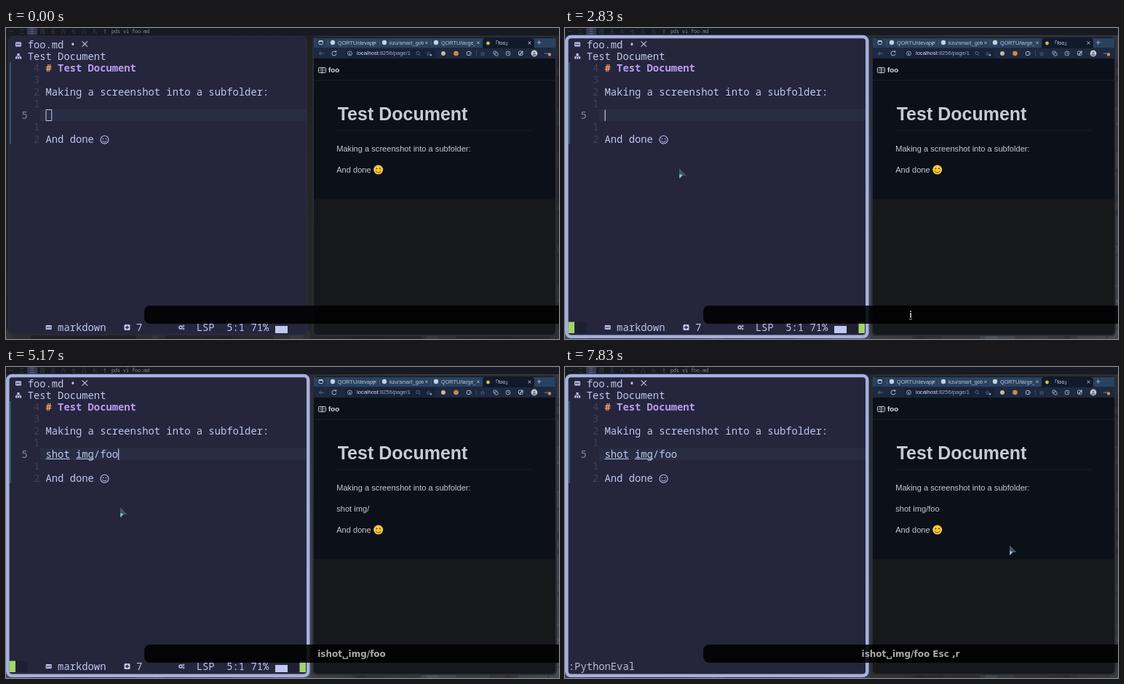
Animation, 760 px wide and 428 px high, one loop 8000 ms. Source, as an HTML page with a canvas:

```html
<!DOCTYPE html>
<html lang="en">
<head>
<meta charset="utf-8">
<title>Editor and preview</title>
<style>
  html, body { margin: 0; height: 100%; overflow: hidden; background: #17181c; }
  canvas { display: block; }
</style>
</head>
<body>
<canvas id="stage" width="760" height="428"></canvas>
<script>
const ctx = document.getElementById('stage').getContext('2d');
const LOOP = 8000;
const CELL = 8.29, ROW = 16.23;
const MONO = '"Noto Sans Mono", "DejaVu Sans Mono", monospace';
const SANS = '"Liberation Sans", Arial, sans-serif';
const FG = '#c0c8f0', TEAL = '#2fb4c4', EDITOR = '#25263c', DIM = '#3d415c';

// When each typed character reaches the editor
const TYPED = [
  [3080, 's'], [3250, 'h'], [3330, 'o'], [3500, 't'], [3750, ' '], [4000, 'i'], [4080, 'm'],
  [4250, 'g'], [4420, '/'], [4580, 'f'], [4670, 'o'], [4830, 'o']
];
// What the key display shows: start, text, number of underlined last keys
const KEYS = [
  [0, '', 0], [2580, 'i', 1], [2920, 'i', 0], [3080, 'is', 1], [3250, 'ish', 1], [3330, 'isho', 2],
  [3500, 'ishot', 1], [3750, 'ishot␣', 1], [4000, 'ishot␣i', 1], [4080, 'ishot␣im', 1],
  [4170, 'ishot␣img', 1], [4420, 'ishot␣img/', 1], [4580, 'ishot␣img/f', 1],
  [4670, 'ishot␣img/fo', 1], [4830, 'ishot␣img/foo', 1], [5080, 'ishot␣img/foo', 0],
  [5670, 'ishot␣img/foo Esc', 0], [6250, 'ishot␣img/foo Esc ,', 0], [6420, 'ishot␣img/foo Esc ,r', 0]
];
const PREVIEW = [[0, ''], [3670, 'sho'], [4750, 'shot img/'], [5500, 'shot img/foo']];

const at = (list, t) => list.filter(e => e[0] <= t).pop();
const ramp = (t, a, b) => {
  const u = Math.min(1, Math.max(0, (t - a) / (b - a)));
  return u * u * (3 - 2 * u);
};
const colX = c => 4.8 + c * CELL;
const rowY = r => 23 + r * ROW;

function rect(x, y, w, h, fill) {
  ctx.fillStyle = fill;
  ctx.fillRect(x, y, w, h);
}

function box(x, y, w, h, r, fill, stroke, width = 1) {
  ctx.beginPath();
  ctx.roundRect(x, y, w, h, r);
  if (fill) { ctx.fillStyle = fill; ctx.fill(); }
  if (stroke) { ctx.strokeStyle = stroke; ctx.lineWidth = width; ctx.stroke(); }
}

function disc(x, y, r, fill, stroke, width = 1) {
  box(x - r, y - r, 2 * r, 2 * r, r, fill, stroke, width);
}

function line(points, color, width = 1) {
  ctx.beginPath();
  for (let i = 0; i < points.length; i += 2) ctx.lineTo(points[i], points[i + 1]);
  ctx.strokeStyle = color;
  ctx.lineWidth = width;
  ctx.stroke();
}

function poly(points, fill) {
  ctx.beginPath();
  for (let i = 0; i < points.length; i += 2) ctx.lineTo(points[i], points[i + 1]);
  ctx.fillStyle = fill;
  ctx.fill();
}

function text(s, x, y, font, color) {
  ctx.font = font;
  ctx.fillStyle = color;
  ctx.fillText(s, x, y);
}

// Text on the terminal's character grid
function cells(s, col, row, color = FG, weight = 400) {
  [...s].forEach((ch, i) => text(ch, colX(col + i), rowY(row) + 4.8, `${weight} 13.8px ${MONO}`, color));
}

function cross(x, y, r, color, width = 1) {
  line([x - r, y - r, x + r, y + r], color, width);
  line([x + r, y - r, x - r, y + r], color, width);
}

function smile(x, y, r, face, ink) {
  disc(x, y, r, face, face ? null : ink, 1.1);
  disc(x - r * .36, y - r * .22, r * .15, ink);
  disc(x + r * .36, y - r * .22, r * .15, ink);
  ctx.beginPath();
  ctx.arc(x, y + r * .05, r * .55, .35, Math.PI - .35);
  ctx.strokeStyle = ink;
  ctx.lineWidth = 1;
  ctx.stroke();
}

function fileIcon(x, y) {
  box(x - 4, y - 3, 8, 6, 1, FG);
  line([x - 2.3, y + 1.5, x - 2.3, y - 1, x - 1, y + .5, x + .2, y - 1, x + .2, y + 1.5], EDITOR, .8);
  line([x + 2.2, y - 1.3, x + 2.2, y + 1.4], EDITOR, .9);
}

function wallpaper(light) {
  const g = ctx.createLinearGradient(0, 0, 760, 428);
  const tone = k => {
    const v = 24 + k * (.35 + light * .65);
    return `rgb(${v},${v + 2},${v + 5 + 5 * light})`;
  };
  [12, 22, 16, 40, 28, 46].forEach((k, i) => g.addColorStop(i / 5, tone(k)));
  rect(0, 0, 760, 428, g);
  for (let i = 0; i < 16; i++) {
    ctx.globalAlpha = .12 + .1 * light;
    disc((i * 97) % 760, 426 - (i % 3), 9 + i % 5 * 3, i % 2 ? '#16171b' : '#737985');
    disc(759, (i * 61) % 428, 6 + i % 4 * 3, i % 2 ? '#16171b' : '#737985');
  }
  ctx.globalAlpha = 1;

  rect(0, 0, 760, 10, '#171a22');
  box(29, 0, 14, 9.5, 1, '#343a50');
  [...'一二三四五六七八九†'].forEach((ch, i) =>
    text(ch, 4 + i * 14.3, 7.3, '6.5px "Noto Sans CJK JP", "Noto Sans CJK SC", sans-serif', i === 2 ? '#8e98b8' : i === 9 ? '#7c8490' : '#424a58'));
  text('pds vi foo.md', 145, 7, `6.7px ${MONO}`, '#8a929c');
}

function popup(left, right, icon, word, hits) {
  rect(left - 3, 135, right - left + 7, 42, 'rgba(27,28,43,.55)');
  box(left, 136.3, right - left, 32.4, 0, '#222338', TEAL, 1.4);
  const c = Math.round((left - 4.8) / CELL - .5);
  const x = colX(c + 2) + 4;
  if (icon === 'T') {
    text('т', x - 6, 157, `bold 8px ${SANS}`, FG);
    text('T', x - 1.5, 157, `bold 9px ${SANS}`, FG);
  } else {
    disc(x - 2.5, 151, 1.2, null, '#777b96');
    disc(x - 2.5, 155.5, 1.2, null, '#777b96');
    line([x - 1.5, 151.5, x + 4, 155.5], '#777b96');
    line([x - 1.5, 155, x + 4, 151], '#777b96');
  }
  [...word].forEach((ch, i) => cells(ch, c + 4 + i, 8, hits.includes(i) ? TEAL : FG));
}

function statusLine(t, insert) {
  if (t >= 6420) {
    cells(':PythonEval', 0, 24, '#b8bed8');
    return;
  }
  if (insert) {
    rect(4.5, 404.5, 8.5, 15.5, '#a3d36d');
    rect(13, 404.5, 17, 15.5, '#1e2032');
    rect(387.5, 404.5, 16, 15.5, '#1e2032');
    rect(403.5, 404.5, 8.5, 15.5, '#a3d36d');
  }
  fileIcon(58.7, 412);
  cells('markdown', 8, 24);
  box(162.5, 408, 8, 8, 1.5, FG);
  line([164, 412, 169, 412], EDITOR, 1.4);
  line([166.5, 409.5, 166.5, 414.5], EDITOR, 1.4);
  cells('7', 21, 24);
  disc(240, 412, 2, null, FG, 1.5);
  disc(244, 410, 1, null, FG);
  disc(244, 414, 1, null, FG);
  cells('LSP', 31, 24);
  if (t >= 5670) cells('5:12', 35, 24);
  else cells('5:1', 36, 24);
  cells('71%', 40, 24);
  rect(370, 410, 17, 10, FG);
}

function editor(t) {
  const focus = ramp(t, 80, 700);
  box(3, 11, 411, 412, 7, '#2a2c38');
  box(4.5, 12, 408, 409 + focus, 5, EDITOR);
  if (focus) {
    ctx.globalAlpha = focus;
    box(2.3, 12, 413, 412.8, 6, null, '#a6b0e0', 4.5);
    ctx.globalAlpha = 1;
  }

  fileIcon(17, 22.5);
  cells('foo.md • ', 3, 0);
  cross(108.3, 22, 3.7, FG, 1.1);
  rect(15.5, 35, 3, 3, FG);
  line([14, 41, 14, 39, 20, 39, 20, 41], FG);
  [13, 16, 19].forEach(x => rect(x, 40, 2.2, 2.5, FG));
  cells('Test Document', 3, 1);
  rect(5, 47, 1.6, 113, '#2d6674');

  rect(47, 112, 366, 16.2, '#292d43');
  ['4', '3', '2', '1', '', '1', '2'].forEach((n, i) => cells(n, 4, 2 + i, DIM));
  cells('5', 2, 6, '#8188ac');
  cells('#', 6, 2, '#ff9e64', 700);
  cells('Test Document', 8, 2, '#bb9af7', 700);
  cells('Making a screenshot into a subfolder:', 6, 4);
  cells('And done', 6, 8);
  smile(135.5, 153.7, 5.5, null, FG);

  const typed = TYPED.filter(k => k[0] <= t).map(k => k[1]).join('');
  const insert = t >= 2580 && t < 5670;
  cells(typed, 6, 6);
  if (typed.length > 4) rect(colX(6), 126, 4 * CELL, 1, FG);
  if (typed.length > 8) rect(colX(11), 126, 3 * CELL, 1, FG);

  if (t < 80) {
    box(55, 112.5, 7.8, 15, 0, null, FG);
  } else if (insert) {
    rect(colX(6 + typed.length), 112.5, 1.2, 15.5, FG);
  } else if (t < 6420) {
    const c = t < 2580 ? 6 : 17;
    rect(colX(c), 112, CELL, 16, FG);
    if (typed) cells('o', c, 6, EDITOR);
  }

  if (t >= 3080 && t < 3750) popup(50.5, 175, 'T', 'screenshot', [0, 7, 8, 9].slice(0, typed.length));
  if (t >= 4000 && t < 4420) popup(91.8, 167, 'cut', 'img~', [0, 1, 2].slice(0, typed.length - 5));
  statusLine(t, insert);
}

function tab(x, label, width) {
  disc(x, 20, 3.2, '#c6d0dd');
  ctx.save();
  ctx.beginPath();
  ctx.rect(x + 7, 13, width, 14);
  ctx.clip();
  text(label, x + 7, 22.7, `7.3px ${SANS}`, '#b9c5d6');
  ctx.restore();
  cross(x + 58, 20.3, 1.7, '#c3ccd8', .8);
}

function browserBar() {
  const ink = '#b9c1ce';
  rect(423, 14, 332, 14, '#294260');
  rect(423, 27, 332, 15, '#1d2940');
  box(427.5, 14.5, 11, 12, 2, '#243a57');
  box(430, 17.5, 5.5, 5, 1, null, ink);
  rect(430, 17.5, 5.5, 1.6, ink);
  tab(449, 'QORTU/devapps', 51);
  tab(520, 'kzu/smart_goto', 47);
  tab(591, 'QORTU/large_e', 47);
  [442, 513, 584].forEach(x => rect(x, 17, .7, 7, '#4a617e'));
  box(655, 14, 71, 14, [4, 4, 0, 0], '#111a2c');
  disc(662.5, 21, 2.4, '#d9bd4d');
  text('「foo」', 669, 22.8, '7.3px "Liberation Sans", "Noto Sans CJK JP", sans-serif', '#d5dce6');
  cross(719.5, 20.5, 1.9, '#d5dce6', .9);
  line([730, 20, 735.5, 20], ink, .8);
  line([732.7, 17.2, 732.7, 22.8], ink, .8);

  line([437, 35, 430.5, 35], '#67748a', .9);
  line([433, 32.5, 430.5, 35, 433, 37.5], '#67748a', .9);
  ctx.beginPath();
  ctx.arc(451, 35, 3, .2, 5.4);
  ctx.strokeStyle = ink;
  ctx.lineWidth = 1;
  ctx.stroke();
  rect(452.3, 31.5, 2, 2, ink);

  box(466, 29, 124, 12, 3, '#17223a');
  disc(472.5, 35, 3, null, ink, .8);
  rect(472, 34, 1, 3, ink);
  text('localhost', 482, 37.3, `7.55px ${SANS}`, '#d8dfe9');
  const w = ctx.measureText('localhost').width;
  text(':8256/page/1', 482 + w, 37.3, `7.55px ${SANS}`, '#a3aebf');
  disc(566, 34.5, 2.2, null, '#66748d', .8);
  line([567.6, 36.2, 569.2, 38], '#66748d', .8);
  text('☆', 577, 38, '8px "DejaVu Sans", sans-serif', ink);
  disc(584, 37.2, 1.3, '#8ba6d0');

  disc(601, 35, 3, '#c6b7a4');
  disc(618.5, 35, 3.3, '#d78a3c');
  box(633.5, 32.5, 5, 5, 1, null, ink);
  disc(638.5, 35, 1.2, '#1d2940', ink, .7);
  rect(646, 31, .7, 8, '#44516a');
  text('☆', 651.5, 38, '8px "DejaVu Sans", sans-serif', ink);
  box(670, 32, 4, 4, 1, null, ink, .8);
  box(672, 34, 4.2, 4, 1, '#1d2940', ink, .8);
  disc(690, 35, 3, null, ink, .8);
  line([690, 33.2, 690, 35, 691.5, 35.7], ink, .8);
  box(704.5, 32, 5.5, 5.5, 1.5, null, ink, .9);
  line([706, 36.5, 710.5, 32], ink, 1.2);
  disc(726, 35, 4.4, '#c9ccd2');
  disc(726, 34, 1.5, '#747a86');
  box(723.5, 35.8, 5, 2.4, 1.2, '#747a86');
  [741, 743.5, 746].forEach(x => disc(x, 35, .7, ink));
  disc(747, 36.5, 2.2, '#d58b56');
}

function browser(t) {
  const extra = at(PREVIEW, t)[1], shift = extra ? 29 : 0;
  const ink = '#c6ccd3', body = `11.1px ${SANS}`;
  box(421, 11, 336, 413, 6, '#292d35');
  box(423, 13, 332, 409, 5, '#17181b');
  rect(423, 40, 332, 195.5 + shift, '#0c1018');
  browserBar();
  rect(423, 71.5, 332, 1, '#1c212a');

  box(429.5, 54.5, 10, 7, 1, null, ink);
  line([434.5, 54.5, 434.5, 62.5], ink);
  [56.7, 59].forEach(y => {
    line([431, y, 433.2, y], ink, .8);
    line([435.8, y, 438, y], ink, .8);
  });
  text('foo', 443, 61, `bold 9.8px ${SANS}`, '#dce1e7');

  text('Test Document', 455.7, 127, `bold 25px ${SANS}`, ink);
  rect(456, 140.5, 268, 1, '#191e27');
  text('Making a screenshot into a subfolder:', 454.2, 170, body, ink);
  text(extra, 454.2, 199, body, ink);
  text('And done', 454.2, 199 + shift, body, ink);
  smile(511.7, 195 + shift, 6.5, '#f6c83e', '#654116');
}

function keyDisplay(t) {
  const [, keys, marked] = at(KEYS, t);
  box(190, 382, 580, 25, 8, 'rgba(0,0,0,.87)');
  ctx.font = 'bold 12px "DejaVu Sans", sans-serif';
  const x = 475 - ctx.measureText(keys).width / 2;
  text(keys, x, 398.8, ctx.font, '#a9a9a9');
  if (marked) {
    const start = ctx.measureText(keys.slice(0, -marked)).width;
    rect(x + start, 400.3, ctx.measureText(keys.slice(-marked)).width, 1, '#a9a9a9');
  }
}

function pointer(t) {
  if (t < 250) return;
  const k = ramp(t, 6670, 7580);
  ctx.save();
  ctx.translate(157 + 454 * k, 194 + 52 * k);
  poly([0, 0, 9, 9, 4.5, 9, 0, 13.5], '#4a525d');
  poly([.3, 13, .3, 7, 4.5, 8.5], '#72d3dc');
  line([0, 0, 9, 9], '#6d7884', .7);
  ctx.restore();
}

function draw(now) {
  const t = now % LOOP;
  const light = ramp(t, 80, 830) * (1 - .5 * ramp(t, 6420, 7580));
  wallpaper(light);
  editor(t);
  browser(t);
  keyDisplay(t);
  pointer(t);
}

const begin = performance.now();
function tick() {
  draw(performance.now() - begin);
  requestAnimationFrame(tick);
}
tick();
</script>
</body>
</html>
```
